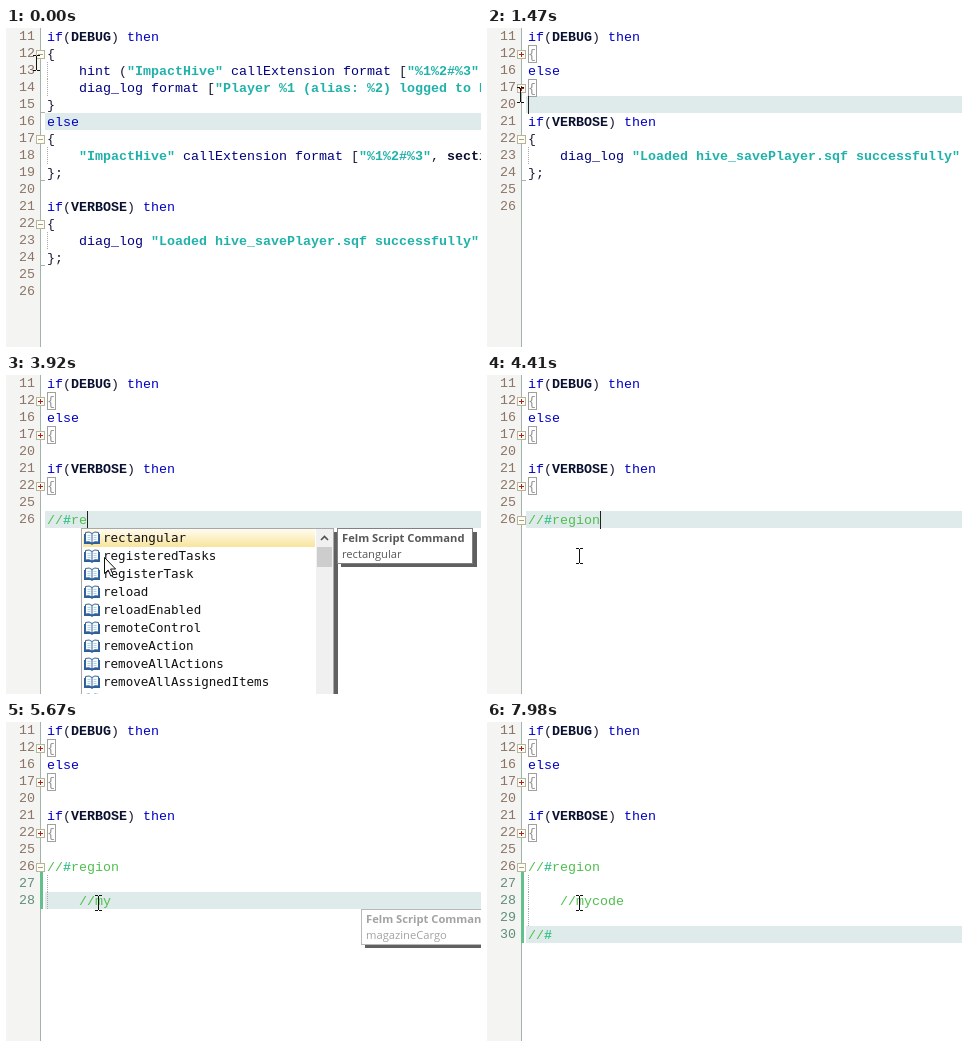
An HTML page that plays this animation: 475 px wide and 319 px high, repeating every 8000 ms.

```html
<!DOCTYPE html>
<html lang="en">
<head>
<meta charset="utf-8">
<title>Code folding</title>
<style>
  html, body { margin: 0; width: 100%; height: 100%; overflow: hidden; background: #fff; }
  svg { display: block; }
  text { white-space: pre; }
  .code { font: 13.333px "Liberation Mono", monospace; }
  .item { font: 12.55px "DejaVu Sans Mono", monospace; fill: #111; }
  .tip { font: 11.2px "Open Sans", sans-serif; fill: #575757; }
  .b { font-weight: bold; }
</style>
</head>
<body>
<svg id="stage" width="475" height="319" viewBox="0 0 475 319"></svg>
<script>
const LOOP = 8000, TICK = 70, ROW = 17, CHAR = 8, LEFT = 41;
const stage = document.getElementById('stage');

const source = {
  11: 'if(DEBUG) then',
  12: '{',
  13: '    hint ("ImpactHive" callExtension format ["%1%2#%3"',
  14: '    diag_log format ["Player %1 (alias: %2) logged to H"',
  15: '}',
  16: 'else',
  17: '{',
  18: '    "ImpactHive" callExtension format ["%1%2#%3", section',
  19: '};',
  21: 'if(VERBOSE) then',
  22: '{',
  23: '    diag_log "Loaded hive_savePlayer.sqf successfully"',
  24: '};'
};

// first line, last line, time it closes
const folds = [[12, 15, 490], [17, 19, 1470], [22, 24, 2310]];

// time, line, column or typed text, caret hidden
const edits = [
  [0, 16, 4, 1], [280, 16, 4], [490, 16, 0], [1050, 16, 0, 1], [1470, 20, 0],
  [2030, 20, 0, 1], [2310, 25, 0], [2730, 26, 0], [3150, 26, 0, 1],
  [3290, 26, '/'], [3360, 26, '//'], [3500, 26, '//', 1], [3710, 26, '//#'],
  [3780, 26, '//#r'], [3920, 26, '//#re'], [4060, 26, '//#reg'],
  [4200, 26, '//#regi'], [4270, 26, '//#regio'], [4410, 26, '//#region'],
  [4480, 26, '//#region', 1],
  [4550, 27, '    '], [4690, 27, '    ', 1], [4900, 28, '    '], [4970, 28, '    ', 1],
  [5110, 28, '    '], [5180, 28, '    /'], [5250, 28, '    //'], [5320, 28, '    //', 1],
  [5460, 28, '    //m'], [5600, 28, '    //my'], [5670, 28, '    //my', 1],
  [5740, 28, '    //myc'], [5810, 28, '    //myco'], [5880, 28, '    //mycod'],
  [6020, 28, '    //mycode'], [6090, 28, '    //mycode', 1],
  [6160, 29, '    '], [6230, 29, '    ', 1], [6300, 30, '    '], [6370, 30, '    ', 1],
  [6510, 30, '    '], [6580, 30, '   '], [6790, 30, '  '], [6860, 30, '  ', 1],
  [6930, 30, ' '], [7000, 30, ''], [7070, 30, '', 1], [7140, 30, ''],
  [7350, 30, '/'], [7420, 30, '//'], [7560, 30, '//', 1], [7910, 30, '//#'], [7980, 30, '//#', 1]
];

// time, x, y of the pointer
const path = [
  [0, 30, 35], [140, 30, 35], [350, 33, 35], [490, 33, 28], [560, 33, 28],
  [910, 33, 46], [1260, 33, 67], [1540, 33, 67], [1890, 33, 93], [2170, 33, 117],
  [2380, 33, 117], [2590, 64, 152], [2730, 92, 181], [LOOP, 92, 181]
];

const popups = [
  { from: 3780, close: 4270, x: 75, y: 153, next: 4060,
    items: ['rectangular', 'registeredTasks', 'registerTask', 'reload', 'reloadEnabled',
      'remoteControl', 'removeAction', 'removeAllActions', 'removeAllAssignedItems', 'removeAllContainers'] },
  { from: 5460, close: 5670, x: 99, y: 187, next: LOOP,
    items: ['magazineCargo', 'magazines', 'magazinesAllTurrets', 'magazinesAmmo',
      'magazinesAmmoCargo', 'magazinesAmmoFull', 'mapAnimAdd', 'mapAnimClear'] }
];

const rect = (x, y, w, h, fill, more = '') =>
  `<rect x="${x}" y="${y}" width="${w}" height="${h}" fill="${fill}" ${more}/>`;
const frame = (x, y, w, h, fill, line) =>
  rect(x + .5, y + .5, w - 1, h - 1, fill, `stroke="${line}"`);
const shadow = (x, y, w, h) =>
  rect(x + 4, y + 4, w, h, '#000', 'opacity=".62" filter="url(#soft)"');
const label = (x, y, str, cls, fill) =>
  `<text x="${x}" y="${y}" class="${cls}"${fill ? ` fill="${fill}"` : ''}>${str}</text>`;
const shape = (d, fill, line) => `<path d="${d}" fill="${fill}" stroke="${line}"/>`;

function tokenStyle(tok) {
  if (tok[0] === '"') return ['#20b2aa', 'code b'];
  if (tok === '#') return ['#3cc48c', 'code b'];
  if (/^(if|then|else)$/.test(tok)) return ['#0000c8', 'code'];
  if (/^(DEBUG|VERBOSE|section)$/.test(tok)) return ['#0a1030', 'code b'];
  return [/^\w/.test(tok) ? '#000080' : '#181838', 'code'];
}

function codeText(str, y) {
  const comment = str.trim()[0] === '/';
  return [...str.matchAll(/"[^"]*"|\w+|#|[^\s\w"#]+/g)].map(m => {
    let [fill, cls] = tokenStyle(m[0]);
    if (comment && m[0] !== '#') [fill, cls] = ['#4fbf4f', 'code'];
    return label(LEFT + m.index * CHAR, y + 13, m[0], cls, fill);
  }).join('');
}

function foldBox(y, closed) {
  const ink = closed ? '#b02020' : '#a8a080';
  return frame(30, y + 5, 9, 9, '#fffef6', '#b8b498') + rect(32, y + 9, 5, 1, ink) +
    (closed ? rect(34, y + 7, 1, 5, ink) : '');
}

const guide = y =>
  `<path d="M41.5 ${y}v${ROW}" stroke="#a8a8a8" stroke-dasharray="1 1"/>`;

function editor(t) {
  const typed = {};
  let now, last = 26;
  for (const e of edits) {
    if (e[0] > t) break;
    now = e;
    last = Math.max(last, e[1]);
    if (typeof e[2] === 'string') typed[e[1]] = e[2];
  }
  const [, line, at, hidden] = now;
  const region = typed[26] === '//#region';
  let out = rect(0, 0, 34, 319, '#f4f4f2') + rect(34, 0, 1, 319, '#a3b3ab');
  let body = '', row = 0;

  for (let n = 11; n <= last; n++) {
    const fold = folds.find(f => n >= f[0] && n <= f[1]);
    const closed = fold && t >= fold[2];
    if (closed && n > fold[0]) continue;
    const y = row++ * ROW;
    if (n === line) out += rect(39, y, 436, ROW, '#dfebea');
    if (n > 26) body += rect(34, y - (n === 27 ? 3 : 0), 3, ROW + (n === 27 ? 3 : 0), '#62c08c');
    body += label(13, y + 12, n, 'code', n > 26 ? '#5f8f78' : '#8c7466');

    const str = typed[n] ?? source[n] ?? '';
    if (closed) {
      body += frame(41, y, 9, ROW + 1, 'none', '#a0a0a0') + label(LEFT, y + 13, '{', 'code', '#909090');
    } else {
      body += codeText(str, y);
    }
    if (fold && n > fold[0] && n < fold[1] || n > 26 && n < 30) body += guide(y);
    if (fold && n === fold[0]) body += foldBox(y, closed);
    if (fold && n === fold[1]) body += rect(35, y + 16, 4, 1, '#a3b3ab');
    if (n === 26 && region) body += foldBox(y, false);
    if (n === line && !hidden) {
      const col = typeof at === 'string' ? at.length : at;
      body += rect(LEFT + col * CHAR, y, 1, ROW + 1, '#222');
    }
  }
  return out + body;
}

function book(x, y) {
  return shape(`M${x} ${y + 3}h16v10h-6.5l-1.5 1l-1.5-1h-6.5z`, '#2c5f9e', 'none') +
    shape(`M${x + 1.5} ${y + 1.5}q4-1.5 6.5 1q2.5-2.5 6.5-1v9.5q-4-1-6.5 1q-2.5-2-6.5-1zM${x + 8} ${y + 2.5}v9.5`, '#f8fcff', '#3a6494') +
    shape(`M${x + 3.5} ${y + 4.5}h3m-3 2h3m-3 2h3m3-4h3m-3 2h3m-3 2h3`, 'none', '#b4cfe6');
}

function list({ x, y, items }, sel) {
  let out = shadow(x, y, 253, 180) + frame(x, y, 253, 180, '#fff', '#a8a8a8');
  out += rect(x + 2, y + 1 + sel * 18, 232, 18, 'url(#pick)');
  items.forEach((name, i) => {
    out += book(x + 3, y + 3 + i * 18) + label(x + 22, y + 14 + i * 18, name, 'item');
  });
  return out + rect(x + 235, y + 1, 17, 178, '#f0f0f0') + rect(x + 236, y + 19, 15, 20, '#cdcdcd') +
    `<path d="M${x + 240} ${y + 12}l3.5-3.5l3.5 3.5" fill="none" stroke="#505050" stroke-width="1.6"/>`;
}

// the ink fades while the card and its shadow stay
function tip({ x, y, items }, sel, alpha) {
  const l = x + 256;
  return shadow(l, y, 136, 35) + rect(l, y, 136, 36, '#fff') + `<g opacity="${alpha}">` +
    frame(l, y, 136, 36, 'none', '#808080') +
    label(l + 5, y + 14, 'Felm Script Command', 'tip b') +
    label(l + 5, y + 30, items[sel], 'tip') + '</g>';
}

function popup(t) {
  return popups.map(p => {
    const late = t - p.close;
    if (t < p.from || late >= 2 * TICK) return '';
    const sel = t >= p.next ? 1 : 0;
    return (late < 0 ? list(p, sel) : '') + tip(p, sel, late < 0 ? 1 : late < TICK ? .55 : .25);
  }).join('');
}

function pointer(t) {
  const i = path.findIndex(p => p[0] > t);
  const [t0, x0, y0] = path[i - 1], [t1, x1, y1] = path[i];
  const k = (t - t0) / (t1 - t0);
  const x = Math.round(x0 + (x1 - x0) * k), y = Math.round(y0 + (y1 - y0) * k);
  const overList = t >= popups[0].from && t < popups[0].close;
  if (overList) {
    return shape('M98.5 182.5v16l3.7-3.5l2.6 6l2.4-1l-2.6-6h5z', '#fff', '#111');
  }
  return rect(x - 3, y - 8, 3, 1, '#111') + rect(x + 1, y - 8, 3, 1, '#111') +
    rect(x, y - 7, 1, 14, '#111') +
    rect(x - 3, y + 7, 3, 1, '#111') + rect(x + 1, y + 7, 3, 1, '#111');
}

const defs = `<defs>
  <linearGradient id="pick" x2="0" y2="1"><stop stop-color="#fffcf0"/><stop offset="1" stop-color="#f8e49c"/></linearGradient>
  <filter id="soft"><feGaussianBlur stdDeviation=".6"/></filter></defs>`;

let shown = -1;
function draw() {
  const t = Math.floor(performance.now() % LOOP / TICK) * TICK;
  if (t !== shown) {
    shown = t;
    stage.innerHTML = defs + editor(t) + popup(t) + pointer(t);
  }
  requestAnimationFrame(draw);
}
draw();
</script>
</body>
</html>
```
